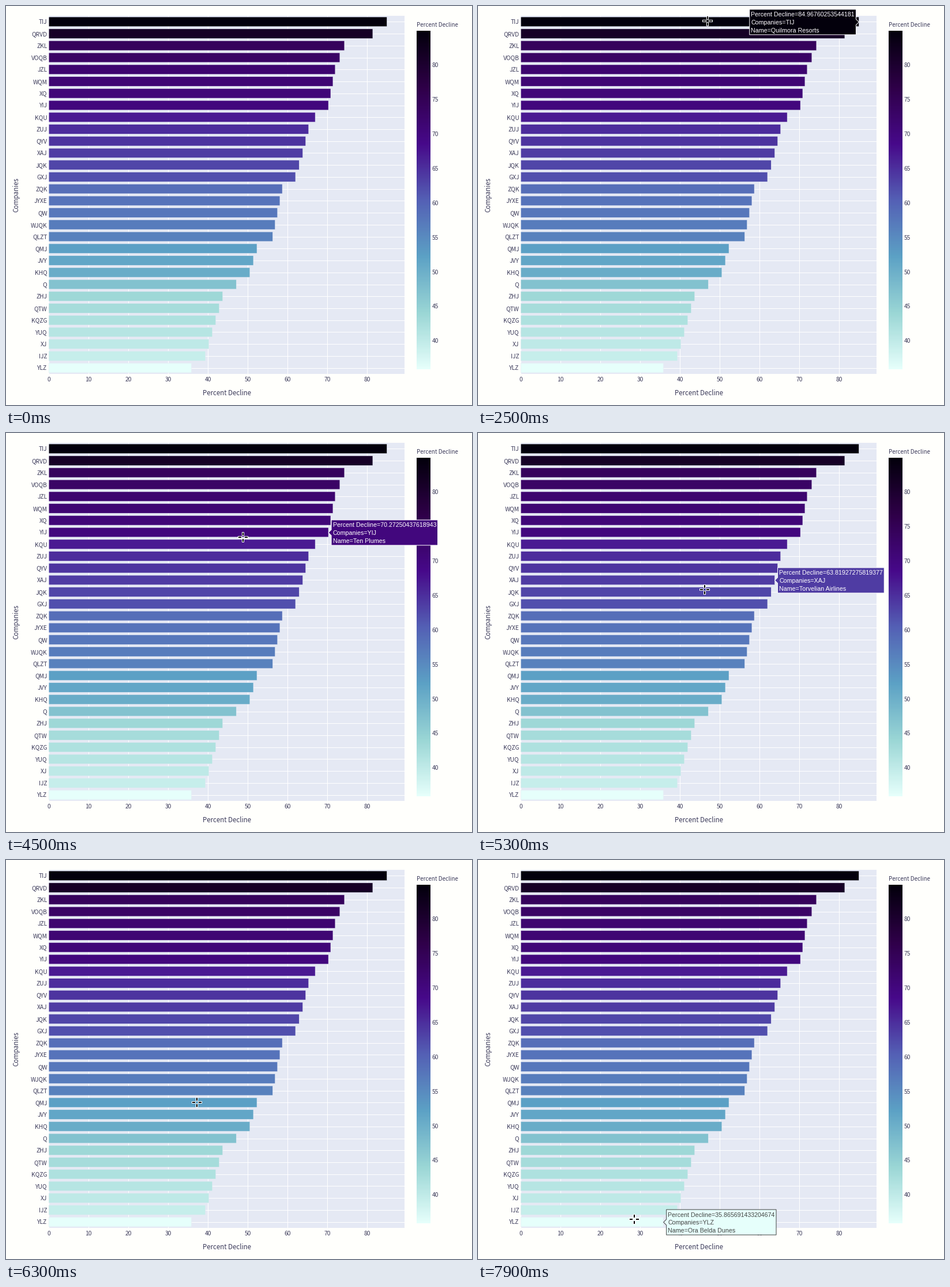
A matplotlib script for the animation above (8 s loop, 808 px wide and 693 px high).

```python
import numpy as np
import matplotlib.pyplot as plt
from matplotlib.animation import FuncAnimation
from matplotlib.colors import LinearSegmentedColormap
from matplotlib.patches import Polygon, Rectangle

W, H, DPI = 808, 693, 64
PT = 72 / DPI  # points per pixel
PAPER, PANEL, INK = "#fffffc", "#e5e9f4", "#3b3a5a"
SANS, TIP_FONT = "Noto Sans CJK JP", "Liberation Sans"
LEFT, RIGHT, TOP, BOTTOM = 74.2, 691.3, 17, 639

COMPANIES = """TIJ Quilmora Resorts
QRVD Velmarish Cruise Lines
ZKL Ostavia Cruises
VOQB Brindel Gaming
JZL Pellamar Cruises
WQM Dorvane Resorts
XQ Larkwen Hotels
YIJ Ten Plumes
KQU Kestora Airlines
ZUJ Merrowin Parks
QYV Tamrelle Vacations
XAJ Torvelian Airlines
JQK Fjellora Air
GXJ Sorvinta Airlines
ZQK Aurivane Casinos
JYXE Wendaro Travel
QW Halbrook Inns
WJQK Jorvale Resorts
QLZT Plinthia Air
QMJ Corvessa Hotels
JVY Stagelume Events
KHQ Ambrelle Hotels
Q Zendrau Hotels
ZHJ Grantova Hotels
QTW Skarn Resorts
KQZG Roametta Trips
YUQ Mesquara Airlines
XJ Borealine Air
IJZ Lumbrio Studios
YLZ Ora Belda Dunes"""
ROWS = [line.split(" ", 1) for line in COMPANIES.splitlines()]

# Corners of the ranked curve; the rows between them are interpolated
CORNERS = {0: 84.96760253544181, 1: 81.41099578777347, 2: 74.3, 4: 71.98,
           7: 70.27250437618943, 8: 66.95, 9: 65.3, 11: 63.81927275819377,
           13: 62.0, 14: 58.68, 18: 56.27, 19: 52.3, 21: 50.53, 23: 43.7,
           28: 39.37, 29: 35.865691433204674}
VALUES = [float(v) for v in np.interp(range(len(ROWS)), list(CORNERS),
                                      list(CORNERS.values()))]
HIGH, LOW = VALUES[0], VALUES[-1]
UNIT = 0.95 * (RIGHT - LEFT) / HIGH  # pixels per percent
PITCH = (BOTTOM - TOP) / len(ROWS)
CMAP = LinearSegmentedColormap.from_list(
    "decline", ["#e6fffb", "#9ad6d5", "#5ca1c5", "#5460b5", "#47098a",
                "#2f0048", "#03000c"], N=512)

# Pointer way points: frame, x, y
PATH = np.array([
    (6, 286, 3), (8, 282, 18), (10, 281, 30), (13, 281, 30), (20, 364, 36),
    (23, 463, 28), (25, 398, 26), (26, 447, 30), (33, 447, 30),
    (35, 445, 52), (37, 445, 52), (38, 444, 60), (45, 411, 181),
    (46, 407, 197), (49, 407, 197), (53, 393, 272), (57, 360, 359),
    (63, 331, 421), (69, 289, 520), (73, 275, 588), (76, 271, 612),
    (79, 271, 624)])

fig = plt.figure(figsize=(W / DPI, H / DPI), dpi=DPI, facecolor=PAPER)
ax = fig.add_axes([0, 0, 1, 1])
ax.axis("off")


def level(value):
    return (value - LOW) / (HIGH - LOW)


def x_of(value):
    return LEFT + value * UNIT


def y_of(row):
    return TOP + (row + 0.5) * PITCH


def pointer_at(frame):
    return [np.interp(frame, PATH[:, 0], PATH[:, k]) for k in (1, 2)]


def hovered_row(frame):
    """Row under the pointer one frame ago; None in the gap between bars."""
    if frame <= PATH[0, 0]:
        return None
    row, offset = divmod((pointer_at(frame - 1)[1] - TOP) / PITCH, 1)
    return int(row) if row >= 0 and abs(offset - 0.5) < 0.44 else None


def label(x, y, text, size=10.2, ha="center", **kw):
    return ax.text(x, y, text, fontsize=size * PT, family=SANS, color=INK,
                   ha=ha, va="baseline", **kw)


def segment(xs, ys, color, width, z):
    return ax.plot(xs, ys, color=color, lw=width * PT, zorder=z,
                   solid_capstyle="butt")[0]


def draw_chart():
    ax.add_patch(Rectangle((LEFT, TOP), RIGHT - LEFT, BOTTOM - TOP,
                           fc=PANEL, lw=0, zorder=0))
    for tick in range(0, 90, 10):
        segment([x_of(tick)] * 2, [TOP, BOTTOM], "white", 1, 1)
        label(x_of(tick), 652, str(tick))
    for row, (ticker, _) in enumerate(ROWS):
        y, value = y_of(row), VALUES[row]
        segment([LEFT, RIGHT], [y, y], "white", 1, 1)
        ax.add_patch(Rectangle((LEFT, y - 0.4 * PITCH), value * UNIT,
                               0.8 * PITCH, fc=CMAP(level(value)),
                               ec=PANEL, lw=0.5 * PT, snap=False, zorder=2))
        label(71.5, y + 3.8, ticker, ha="right")
    label(383, 675.5, "Percent Decline", 11.5)
    label(21, 328, "Companies", 11.5, rotation=90, rotation_mode="anchor")


def draw_colorbar():
    top, bottom = 43, 631
    ax.imshow(np.linspace(1, 0, bottom - top)[:, None], cmap=CMAP,
              vmin=0, vmax=1, extent=(712, 736, bottom, top),
              aspect="auto", zorder=2)
    label(712, 35.5, "Percent Decline", 9.9, ha="left")
    for tick in range(40, 85, 5):
        y = bottom - level(tick) * (bottom - top)
        label(738.5, y + 3.8, str(tick), ha="left")


class Tooltip:
    def __init__(self):
        self.box = ax.add_patch(Polygon([(0, 0), (1, 1), (2, 0)],
                                        lw=1 * PT, zorder=5))
        self.lines = [ax.text(0, 0, "", fontsize=10.65 * PT, zorder=6,
                              family=TIP_FONT, va="baseline")
                      for _ in range(3)]

    def show(self, row):
        for artist in (self.box, *self.lines):
            artist.set_visible(row is not None)
        if row is None:
            return
        ticker, name = ROWS[row]
        value = VALUES[row]
        fill = CMAP(level(value))
        dark = np.dot(fill[:3], (0.299, 0.587, 0.114)) < 0.5
        ink = "white" if dark else "#444444"
        texts = (f"Percent Decline={value}", f"Companies={ticker}",
                 f"Name={name}")
        for line, text in zip(self.lines, texts):
            line.set_text(text)
            line.set_color(ink)
        width = self.lines[0].get_window_extent().width + 5
        tip, y = x_of(value), y_of(row) + 0.5
        side = -1 if tip + 5 + width > W else 1
        near, far = tip + 5 * side, tip + (5 + width) * side
        self.box.set_xy([(tip, y), (near, y - 5), (near, y - 22),
                         (far, y - 22), (far, y + 22), (near, y + 22),
                         (near, y + 5)])
        self.box.set_facecolor(fill)
        self.box.set_edgecolor(ink)
        for i, line in enumerate(self.lines):
            line.set_position((min(near, far) + 2.5, y - 9.6 + 13.85 * i))


class Pointer:
    """Four black arms with white outlines around an open centre."""

    def __init__(self):
        self.arms = []
        for start, end, color, width in ((2, 9, "white", 4),
                                         (3, 8, "black", 2)):
            for dx, dy in ((1, 0), (-1, 0), (0, 1), (0, -1)):
                ends = np.array([start, end])
                self.arms.append((segment([0, 0], [0, 0], color, width, 8),
                                  ends * dx, ends * dy))

    def place(self, frame):
        x, y = pointer_at(frame)
        for arm, xs, ys in self.arms:
            arm.set_data(xs + x, ys + y)
            arm.set_visible(frame >= PATH[0, 0])


draw_chart()
draw_colorbar()
tooltip, pointer = Tooltip(), Pointer()
ax.set_xlim(0, W)
ax.set_ylim(H, 0)


def update(frame):
    tooltip.show(hovered_row(frame))
    pointer.place(frame)
    return []


anim = FuncAnimation(fig, update, frames=80, interval=100, repeat=True,
                     repeat_delay=0)
plt.show()
```
